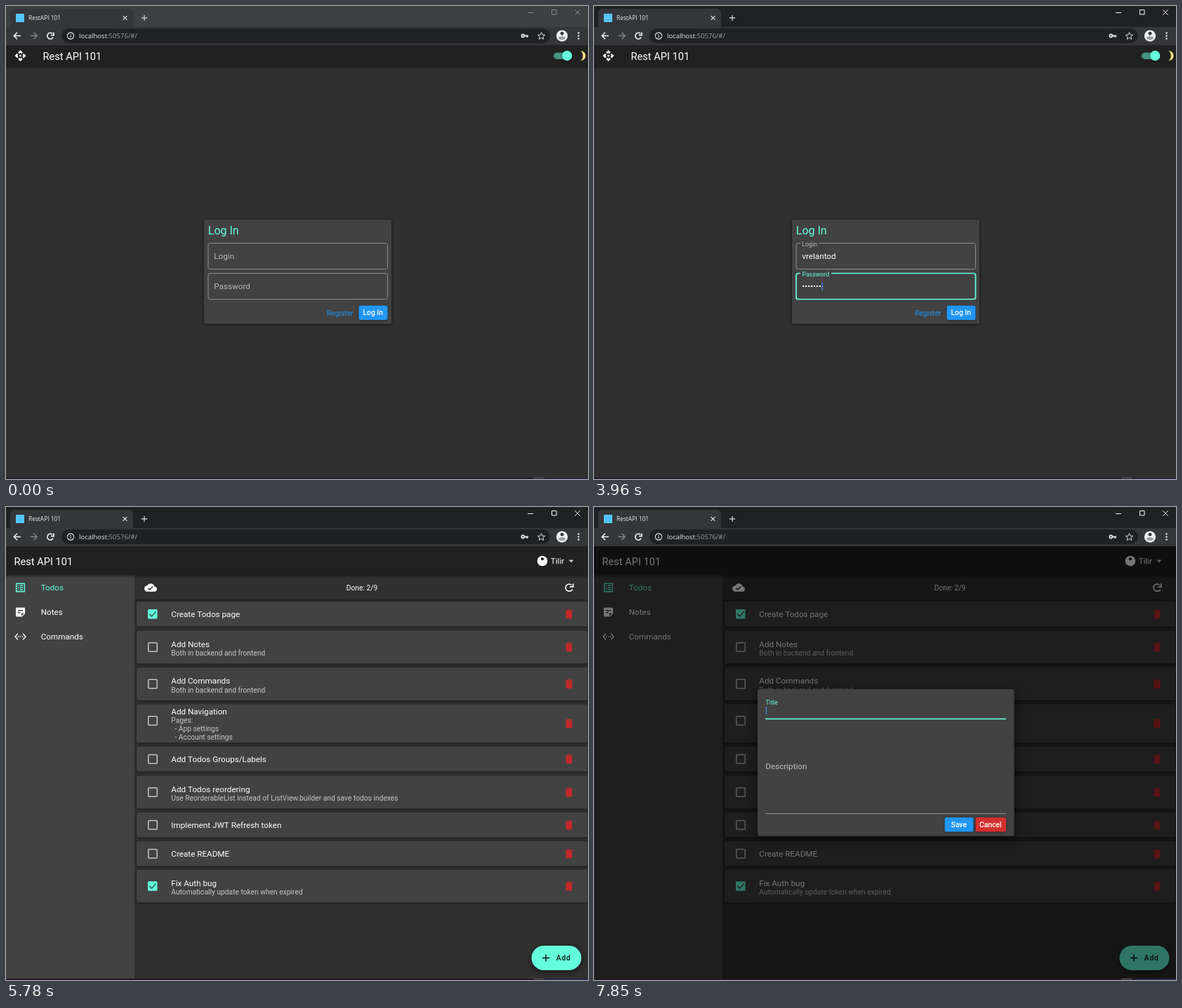
An HTML page with a canvas that plays this animation: 829 px wide and 675 px high, repeating every 7990 ms.

```html
<!DOCTYPE html>
<html lang="en">
<head>
<meta charset="utf-8">
<title>Rest API 101</title>
<style>
  html, body { margin: 0; width: 829px; height: 675px; overflow: hidden; background: #303030; }
  canvas { display: block; }
</style>
</head>
<body>
<canvas id="stage" width="829" height="675"></canvas>
<script>
const LOOP = 7990, W = 829, H = 675, ACCENT = '#64ffda', BLUE = '#2196f3';
const screen = document.getElementById('stage').getContext('2d');
const scratch = document.createElement('canvas');
scratch.width = W; scratch.height = H;
const layer = scratch.getContext('2d');
let c = screen;

const USER = 'vrelantod', OWNER = 'Tilir';
const userKeys = [1120, 1220, 1390, 1480, 1680, 1780, 1880, 1980, 2310];
const passwordKeys = [3000, 3130, 3230, 3560, 3660, 3760, 3960, 4290];

// top, height, title, details, done
const todos = [
  [135, 35.5, 'Create Todos page', [], true],
  [176.5, 47, 'Add Notes', ['Both in backend and frontend']],
  [229, 47, 'Add Commands', ['Both in backend and frontend']],
  [281.5, 55, 'Add Navigation', ['Pages:', '  - App settings', '  - Account settings']],
  [342, 35.5, 'Add Todos Groups/Labels', []],
  [383.5, 47, 'Add Todos reordering', ['Use ReorderableList instead of ListView.builder and save todos indexes']],
  [436, 35.5, 'Implement JWT Refresh token', []],
  [477, 35.5, 'Create README', []],
  [517.5, 47, 'Fix Auth bug', ['Automatically update token when expired'], true]
];

const ramp = (t, from, to) => Math.min(1, Math.max(0, (t - from) / (to - from)));
const easeOut = p => 1 - (1 - p) ** 2;
const mix = (a, b, p) => a + (b - a) * p;
const blend = (a, b, p) => `rgb(${a.map((v, i) => Math.round(mix(v, b[i], p)))})`;
const typed = (keys, t) => keys.filter(k => k <= t).length;
const toAccent = (grey, p) => blend([grey, grey, grey], [100, 255, 218], p);

function rect(x, y, w, h, color) {
  c.fillStyle = color;
  c.fillRect(x, y, w, h);
}

function box(x, y, w, h, r, color, shadow = 0) {
  c.save();
  c.shadowColor = 'rgba(0,0,0,.6)';
  c.shadowBlur = shadow;
  c.shadowOffsetY = shadow / 4;
  c.fillStyle = color;
  c.beginPath();
  c.roundRect(x, y, w, h, r);
  c.fill();
  c.restore();
}

function outline(x, y, w, h, r, color, width = 1) {
  c.strokeStyle = color;
  c.lineWidth = width;
  c.beginPath();
  c.roundRect(x, y, w, h, r);
  c.stroke();
}

function circle(x, y, r, color) {
  box(x - r, y - r, 2 * r, 2 * r, r, color);
}

function text(s, x, y, size, color = '#fff', weight = 400, family = 'Roboto') {
  c.font = `${weight} ${size}px ${family}, sans-serif`;
  c.fillStyle = color;
  c.fillText(s, x, y);
}
const uiText = (s, x, y, size, color) => text(s, x, y, size, color, 400, '"Open Sans"');

// Icons live on a 24 unit grid; without a line width they are filled.
function icon(d, x, y, size, color, line) {
  c.save();
  c.translate(x - size / 2, y - size / 2);
  c.scale(size / 24, size / 24);
  c.fillStyle = c.strokeStyle = color;
  c.lineWidth = line || 1;
  line ? c.stroke(new Path2D(d)) : c.fill(new Path2D(d), 'evenodd');
  c.restore();
}
const CROSS = 'M5 5L19 19M19 5L5 19', PLUS = 'M12 5V19M5 12H19', DROP = 'M7 10l5 5 5-5z';
const RELOAD = 'M18.5 15.5A7 7 0 1 1 17 7M20 4V10.5H13.5';

function person(x, y, size, color, back) {
  const u = size / 24;
  circle(x, y, 10 * u, color);
  circle(x, y - 4 * u, 3 * u, back);
  c.beginPath();
  c.ellipse(x, y + 4 * u, 6 * u, 3 * u, 0, 0, 7);
  c.fill();
}

function keyIcon(x, y, color) {
  c.strokeStyle = color;
  c.lineWidth = 1.8;
  c.beginPath();
  c.arc(x - 2.6, y, 2, 0, 7);
  c.moveTo(x - 0.5, y);
  c.lineTo(x + 5, y);
  c.moveTo(x + 3.4, y);
  c.lineTo(x + 3.4, y + 2.4);
  c.stroke();
}

function group(alpha, scale, draw) {
  if (alpha <= 0) return;
  layer.clearRect(0, 0, W, H);
  c = layer;
  draw();
  c = screen;
  c.save();
  c.globalAlpha = alpha;
  c.translate(658, 56);
  c.scale(scale, scale);
  c.drawImage(scratch, -658, -56);
  c.restore();
}

function browser(t) {
  const active = t >= 430, control = active ? '#fff' : '#8b8d90';
  rect(0, 0, W, 56, active ? '#202124' : '#3c4043');
  box(6, 4, 175, 30, 6, '#35363a');
  rect(0, 30, W, 26, '#35363a');
  rect(14, 11, 12, 12, '#54c5f8');
  uiText('RestAPI 101', 32, 20, 8.4, '#e8eaed');
  icon(CROSS, 169.5, 17, 10, '#dfe1e5', 3);
  icon(PLUS, 197, 17, 14, '#c4c7ca', 2.4);
  rect(743, 9, 8, 1, control);
  outline(777.5, 5.5, 6.5, 6.5, 0, control);
  icon(CROSS, 814, 9, 13, control, 1.8);
  icon('M20 12H5M12 4.5L4.5 12 12 19.5', 16, 42.5, 15, '#f1f3f4', 2.4);
  icon('M4 12H19M12 4.5L19.5 12 12 19.5', 39.5, 42.5, 15, '#85888b', 2.2);
  icon(RELOAD, 63, 42.5, 15, '#f1f3f4', 2.6);
  box(79, 32, 696, 21, 10.5, '#202124');
  icon('M12 3a9 9 0 1 0 .01 0M12 7v2.5M12 11v6', 92, 42.5, 12.5, '#e8eaed', 2.2);
  uiText('localhost', 104, 46, 9.55, '#e8eaed');
  uiText(':50576/#/', 144, 46, 9.55, '#9aa0a6');
  if (t >= 4720 && t < 5700) box(728, 34, 22, 17, 8.5, '#5f6368');
  keyIcon(739, 42.5, '#dfe1e5');
  icon('M12 3l2.7 6.3 6.8.6-5.200 4.500 1.600 6.600L12 17.500 6.100 21l1.600-6.600L2.500 9.900l6.800-.6z', 762.5, 42.5, 13, '#dfe1e5', 1.8);
  person(792, 42.5, 19.5, '#f1f3f4', '#35363a');
  for (const y of [38.5, 42.5, 46.5]) circle(815.5, y, 1.2, '#e8eaed');
}

function taskbar() {
  rect(0, 673, W, 2, '#24172f');
  rect(751, 673, 16, 1, '#66606a');
  rect(770, 673, 59, 2, '#2b2350');
}

function loginHeader() {
  box(-9, 56, W + 18, 29.5, 0, '#212121', 5);
  icon('M12 9.500l2.500 2.500-2.500 2.500-2.500-2.500z', 20.500, 71, 17.5, '#fff');
  for (let i = 0; i < 4; i++) {
    c.save();
    c.translate(20.5, 71);
    c.rotate(i * Math.PI / 2);
    icon('M12 1L16.6 5.6 14.1 8.1 12 6 9.900 8.100 7.400 5.600z', 0, 0, 17.5, '#fff');
    c.restore();
  }
  text('Rest API 101', 52.5, 76.5, 14.6);
  box(780, 66.5, 24, 9.5, 4.75, '#43957f');
  box(792, 63.8, 14.4, 14.4, 7.2, ACCENT, 3);
  icon('M7 2a10 10 0 1 1 0 20a13 13 0 0 0 0-20z', 822, 71, 17, '#ffe680');
}

function caret(x, y) {
  rect(x, y, 1.3, 11.5, '#3f8fe0');
}

function field(y, label, value, focus, float, showCaret) {
  const size = mix(11.7, 8.8, float), tint = toAccent(184, focus);
  outline(288, y, 255.5, 37, 3, toAccent(146, focus), mix(1, 1.7, focus));
  c.font = `400 ${size}px Roboto, sans-serif`;
  if (float > 0) rect(294, y - 2, (c.measureText(label).width + 5) * float, 4, '#424242');
  text(label, 296.3, y + mix(22.7, 4.3, float), size, tint);
  text(value, 296.3, y + 22.3, 11.7);
  if (showCaret) caret(297 + c.measureText(value).width, y + 12.7);
}

function button(x, y, w, h, color, label, textX) {
  box(x, y, w, h, 2.5, color, 2);
  text(label, textX, y + h / 2 + 3.7, 10.25, '#fff', 500);
}

function loginCard(t) {
  const first = easeOut(ramp(t, 430, 600)), next = easeOut(ramp(t, 2470, 2640));
  const end = ramp(t, 4320, 4440);
  box(282, 305, 267, 148.5, 3, '#424242', 4);
  text('Log In', 287.8, 325.5, 16, ACCENT);
  const user = USER.slice(0, typed(userKeys, t));
  const dots = '•'.repeat(typed(passwordKeys, t));
  const blinkOff = t >= 960 && t < 1120;
  field(338.5, 'Login', user, first * (1 - next), first, t >= 430 && t < 2470 && !blinkOff);
  field(381.5, 'Password', dots, next * (1 - end), next, t >= 2470 && t < 4320);
  text('Register', 457, 441.6, 10.25, BLUE);
  button(502.5, 427.5, 41, 20.5, BLUE, 'Log In', 508.5);
}

function spinner(t) {
  const p = ramp(t, 4680, 5350);
  c.strokeStyle = ACCENT;
  c.lineWidth = 3;
  c.beginPath();
  c.arc(416.5, 379, 13, -1.68 + p, -1.45 + p * 7);
  c.stroke();
}

function todoRow([top, h, title, details, done]) {
  const mid = top + h / 2, cy = Math.min(mid, top + 23.5);
  box(186, top, 642.5, h, 3, '#424242', 3);
  if (done) {
    box(202, cy - 6.8, 13.6, 13.6, 1.5, ACCENT);
    icon('M5 12l5 5L19 7', 208.8, cy, 16, '#3b3b3b', 2);
  } else outline(202.8, cy - 6.2, 12.4, 12.4, 1, '#c6c6c6', 1.5);
  const base = !details.length ? mid + 4.2 : top + (details.length > 1 ? 14 : 23.2);
  text(title, 235.3, base, 11.7);
  details.forEach((line, i) => text(line, 235.3, base + 12.4 + i * 11.9, 10.25, '#c6c6c6'));
  icon('M6 7H18V19a2 2 0 0 1-2 2H8a2 2 0 0 1-2-2zM5 4h3.5l1-1h5l1 1H19v2H5z', 802, mid, 17.5, '#c62828');
}

function todoPage(t) {
  rect(0, 56, W, 619, '#303030');
  todos.forEach(todoRow);
  box(183, 97, 660, 35, 0, '#303030', 3);
  rect(0, 97, 183, 577, '#424242');
  box(-9, 56, W + 18, 41, 0, '#212121', 4);
  text('Rest API 101', 11.5, 82.6, 14.6);
  person(764, 77, 17.5, '#fff', '#212121');
  text(OWNER, 775.8, 81.2, 11.7);
  icon(DROP, 805, 77, 17, '#d0d0d0');

  icon('M4 4H20V20H4zM7 8h2M11 8h6M7 12h2M11 12h6M7 16h2M11 16h6', 20.5, 115, 17.5, ACCENT, 2);
  icon('M5 3H19a2 2 0 0 1 2 2V15l-6 6H5a2 2 0 0 1-2-2V5a2 2 0 0 1 2-2zM7 8V10H17V8zM7 12v2h5v-2zM14 19.5V14h5.500z', 20.500, 150, 17.5, '#fff');
  icon('M7 6L2 12l5 6M17 6l5 6-5 6M7 12h2M11 12h2M15 12h2', 20.5, 185, 17.5, '#fff', 2);
  text('Todos', 49.7, 119.2, 11.7, ACCENT);
  text('Notes', 49.7, 154.2, 11.7);
  text('Commands', 49.7, 189.2, 11.7);

  icon('M6 20a6 6 0 0 1-.6-12A7.500 7.500 0 0 1 19.400 10A5 5 0 0 1 19 20z', 206, 115, 17.5, '#fff');
  icon('M7 13l3.500 3L16 10', 206, 115, 17.5, '#303030', 2);
  text('Done: 2/9', 484.7, 118.5, 10.25);
  icon(RELOAD, 802, 115, 17.5, '#fff', 2.2);

  box(748.5, 626, 71, 35, 17.5, ACCENT, 8);
  const press = ramp(t, 6770, 6950);
  if (press > 0 && t < 7100) {
    c.save();
    c.beginPath();
    c.roundRect(748.5, 626, 71, 35, 17.5);
    c.clip();
    circle(784, 643.5, 40 * press, `rgba(255,255,255,${0.18 * (1 - ramp(t, 6950, 7100))})`);
    c.restore();
  }
  icon(PLUS, 769, 643.5, 17.5, '#111', 2);
  c.letterSpacing = '0.88px';
  text('Add', 783.7, 647.2, 10.25, '#111', 500);
  c.letterSpacing = '0px';
}

function bubbleArt() {
  const line = '#55585c', gold = '#fdd663';
  const device = (x, y, w, h) => {
    box(x, y, w, h, 3, '#292a2d');
    outline(x, y, w, h, 3, line, 2);
  };
  for (const [x, y] of [[568, 90], [607, 77], [747, 108]])
    icon('M1 18Q2 10 8 12Q13 4 18 11Q23 11 23 18', x, y, 18, line, 2);
  device(586, 89, 37, 51);
  device(570, 102, 22, 40);
  device(667, 90, 60, 46);
  outline(673, 95, 48, 36, 1, line);
  box(650, 136, 112, 5, 2, line);
  rect(558, 141, 66, 1.5, line);
  person(581, 117, 10, line, '#292a2d');
  person(691, 113, 10, line, '#292a2d');
  rect(699, 112, 11, 2, line);
  rect(576, 127, 10, 1.5, line);
  box(611, 105, 71, 21, 3, '#8ab4f8');
  for (const x of [625, 641, 658, 674])
    icon('M12 4V20M5 8L19 16M19 8L5 16', x, 115.5, 13, '#303b50', 3);
  icon('M12 3V21', 648, 88.5, 13, gold, 4);
  icon('M5 5L19 19', 610, 99, 11, gold, 4);
  icon('M19 5L5 19', 686, 98, 11, gold, 4);
  c.save();
  c.translate(704, 143);
  c.rotate(-0.25);
  box(-33, -1, 30, 7, 2, gold);
  rect(-28, 5, 4, 4, gold);
  rect(-20, 5, 4, 3, gold);
  c.beginPath();
  c.ellipse(0, 0, 13, 10, 0, 0, 7);
  c.fill();
  circle(4, 0, 2.3, '#4a4433');
  c.restore();
}

function bubble(t) {
  const label = '#dadce0';
  box(543, 56, 230, 247, 3, '#292a2d', 7);
  bubbleArt();
  circle(761.5, 66, 7, `rgba(255,255,255,${0.12 * ramp(t, 5150, 5310)})`);
  icon(CROSS, 761.5, 66, 11, '#9aa0a6', 2.5);
  uiText('Save password?', 553.7, 192, 10.15, '#e8eaed');
  uiText('Username', 553.7, 216, 7.95, label);
  uiText('Password', 553.7, 248, 7.95, label);
  box(604, 202, 157, 22, 2, '#202124');
  box(604, 234, 134, 22, 2, '#202124');
  uiText(USER, 610, 216, 8, label);
  for (let i = 0; i < 8; i++) circle(612.3 + i * 5, 245, 1.4, label);
  icon(DROP, 753, 213, 14, label);
  icon(DROP, 730, 245, 14, label);
  icon('M1 12Q12-3 23 12Q12 27 1 12zM12 8a4 4 0 1 0 .01 0z', 755.5, 245, 11.5, '#9aa0a6');
  box(662, 268, 47, 23, 2.5, '#8ab4f8');
  outline(714.5, 268.5, 46.5, 22, 2.5, '#3c4043');
  uiText('Save', 675.5, 282.5, 8, '#202124');
  uiText('Never', 726, 282.5, 8, '#8ab4f8');
}

function dialog(t) {
  const p = easeOut(ramp(t, 7470, 7660));
  box(233, 260, 365.5, 209.5, 3, '#424242', 16);
  text('Title', 244.5, mix(288, 282.3, p), mix(11.7, 8.8, p), toAccent(190, p));
  rect(244, 302, 343, 1, '#929292');
  if (p > 0) {
    rect(244, 301.6, 343, 1 + 0.6 * p, toAccent(146, p));
    caret(244.8, 284.7);
  }
  text('Description', 244.3, 374.4, 11.7, '#bebebe');
  rect(244, 437, 343, 1, '#929292');
  button(499.5, 443, 41, 20.5, BLUE, 'Save', 508.7);
  button(543.5, 443, 43.5, 20.5, '#d32f2f', 'Cancel', 549);
}

function draw(now) {
  const t = now % LOOP;
  rect(0, 0, W, H, '#303030');
  if (t < 4760) {
    loginHeader();
    t < 4680 ? loginCard(t) : spinner(t);
  } else todoPage(t);
  const open = easeOut(ramp(t, 6900, 7060));
  rect(0, 56, W, 617, `rgba(0,0,0,${0.54 * open})`);
  group(open, 1, () => dialog(t));
  browser(t);
  const shown = ramp(t, 4675, 4820);
  group(shown * (1 - ramp(t, 5500, 5700)), mix(0.97, 1, shown), () => bubble(t));
  taskbar();
  requestAnimationFrame(() => draw(performance.now()));
}
draw(0);
</script>
</body>
</html>
```
